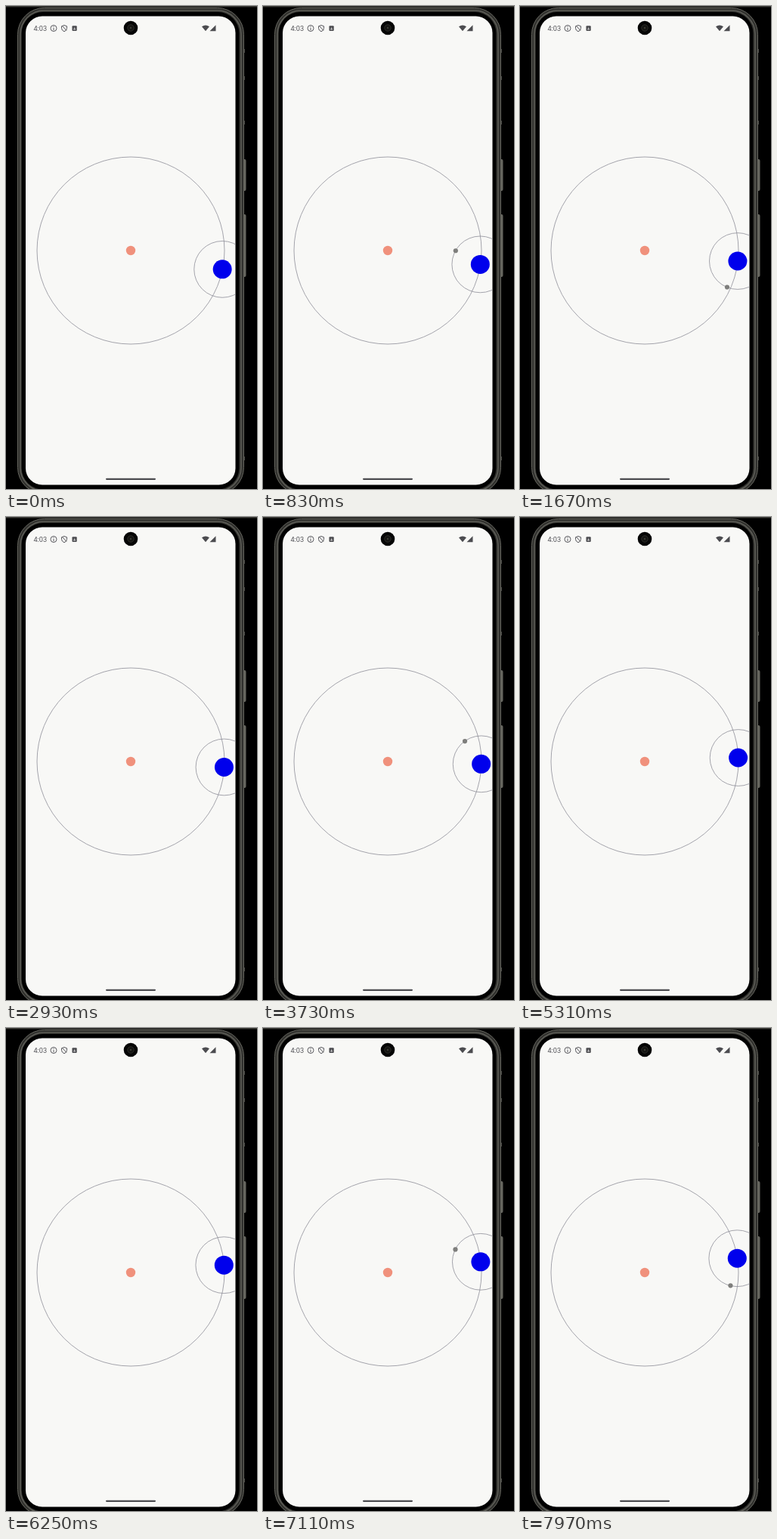
Write an HTML page that moves like this. It is 332x640 px and loops after 8 s.

```html
<!DOCTYPE html>
<html lang="en">
<head>
<meta charset="utf-8">
<title>Orbit</title>
<style>
  html, body { margin: 0; width: 100%; height: 100%; overflow: hidden; background: #000; }
  svg { display: block; width: 100vw; height: 100vh; }
  text { font: 9.2px Roboto, sans-serif; fill: #55555a; }
  .orbit { fill: none; stroke: #8e8e98; stroke-width: .8; }
  .icon { fill: none; stroke: #55555a; stroke-width: 1; }
  .solid { fill: #4c4c50; }
  .metal { fill: #66665f; }
</style>
</head>
<body>
<svg viewBox="0 0 332 640">
  <defs>
    <clipPath id="screen"><rect x="26" y="13.5" width="277.5" height="621" rx="22"/></clipPath>
  </defs>

  <!-- Phone body -->
  <path d="M0 .8H332" stroke="#55554e"/>
  <rect class="metal" x="313" y="203" width="4.5" height="42" rx="2"/>
  <rect class="metal" x="313" y="276" width="4.5" height="83" rx="2"/>
  <path d="M315.5 57v5M315.5 93v5M315.5 152v5M315.5 597v5" stroke="#444440"/>
  <rect x="15.5" y="2.5" width="299" height="644" rx="35" fill="#30302d" stroke="#66665f"/>
  <rect x="19" y="6" width="292" height="637" rx="31.5" fill="none" stroke="#5c5c56" stroke-width="1.6"/>
  <rect x="20.8" y="8" width="287.5" height="632.5" rx="28"/>

  <g clip-path="url(#screen)">
    <rect x="26" y="13" width="278" height="623" fill="#f8f8f6"/>

    <!-- Orbits -->
    <circle class="orbit" cx="165" cy="324" r="124"/>
    <g id="planet">
      <circle class="orbit" r="37.4"/>
      <circle r="12.5" fill="#0000ec"/>
      <circle id="moon" r="3.1" fill="#7e7e7c"/>
    </g>
    <circle cx="165" cy="324" r="6.2" fill="#f0917c"/>

    <!-- Status bar -->
    <text x="36.4" y="32.9">4:03</text>
    <circle class="icon" cx="63" cy="29.5" r="4"/>
    <path class="icon" d="M63 27v1M63 29v3"/>
    <path class="icon" d="M77 25.5l3.5 1.3v2.6q0 3-3.5 4.4q-3.5-1.4-3.5-4.4v-2.6zM74 26l6 6.5"/>
    <rect class="solid" x="87.5" y="26.3" width="6.2" height="6.6" rx="1"/>
    <path d="M89 31.5l1.6-3.4l1.6 3.4z" fill="#c4c4c4"/>
    <path class="solid" d="M259 27.3q5-3.4 10 0l-5 6z"/>
    <path class="solid" d="M277.5 25.2v8h-8z"/>
    <rect class="solid" x="132" y="625.7" width="66" height="2.2" rx="1.1"/>
  </g>

  <!-- Camera -->
  <circle cx="165" cy="29" r="9.3" fill="#050505"/>
  <circle cx="165" cy="29" r="4.3" fill="#151513" stroke="#2a2a26"/>
  <circle cx="165" cy="29" r="1.2" fill="#3c3c34"/>
</svg>
<script>
  const LOOP = 8000;
  const CYCLE = 420, OFFSET = 90, TICK = 45, LAST_TICK = 315;
  const LAG = 410, LAG_END = 480;

  const planet = document.getElementById('planet');
  const moon = document.getElementById('moon');
  const floorTo = (value, step) => Math.floor(value / step) * step;

  const polar = (degrees, radius) => {
    const a = degrees * Math.PI / 180;
    return [radius * Math.cos(a), radius * Math.sin(a)];
  };

  const place = (node, x, y) => node.setAttribute('transform', `translate(${x} ${y})`);

  // Short even steps, with a longer pause closing each cycle.
  function steppedTime(t) {
    const start = OFFSET + floorTo(t - OFFSET, CYCLE);
    return start + Math.min(floorTo(t - start, TICK), LAST_TICK);
  }

  // The orbits start behind and catch up at an even rate.
  const orbitTime = t => t - LAG * Math.max(0, 1 - t / LAG_END);

  function draw(now) {
    const s = orbitTime(steppedTime(now % LOOP)) / 1000;
    const [x, y] = polar(10.54 - 2.42 * s, 123.7);
    place(planet, 165 + x, 324 + y);
    place(moon, ...polar(304.5 - 115.6 * s, 37.2));
  }

  const origin = performance.now();
  function frame() {
    draw(performance.now() - origin);
    requestAnimationFrame(frame);
  }
  frame();
</script>
</body>
</html>
```
